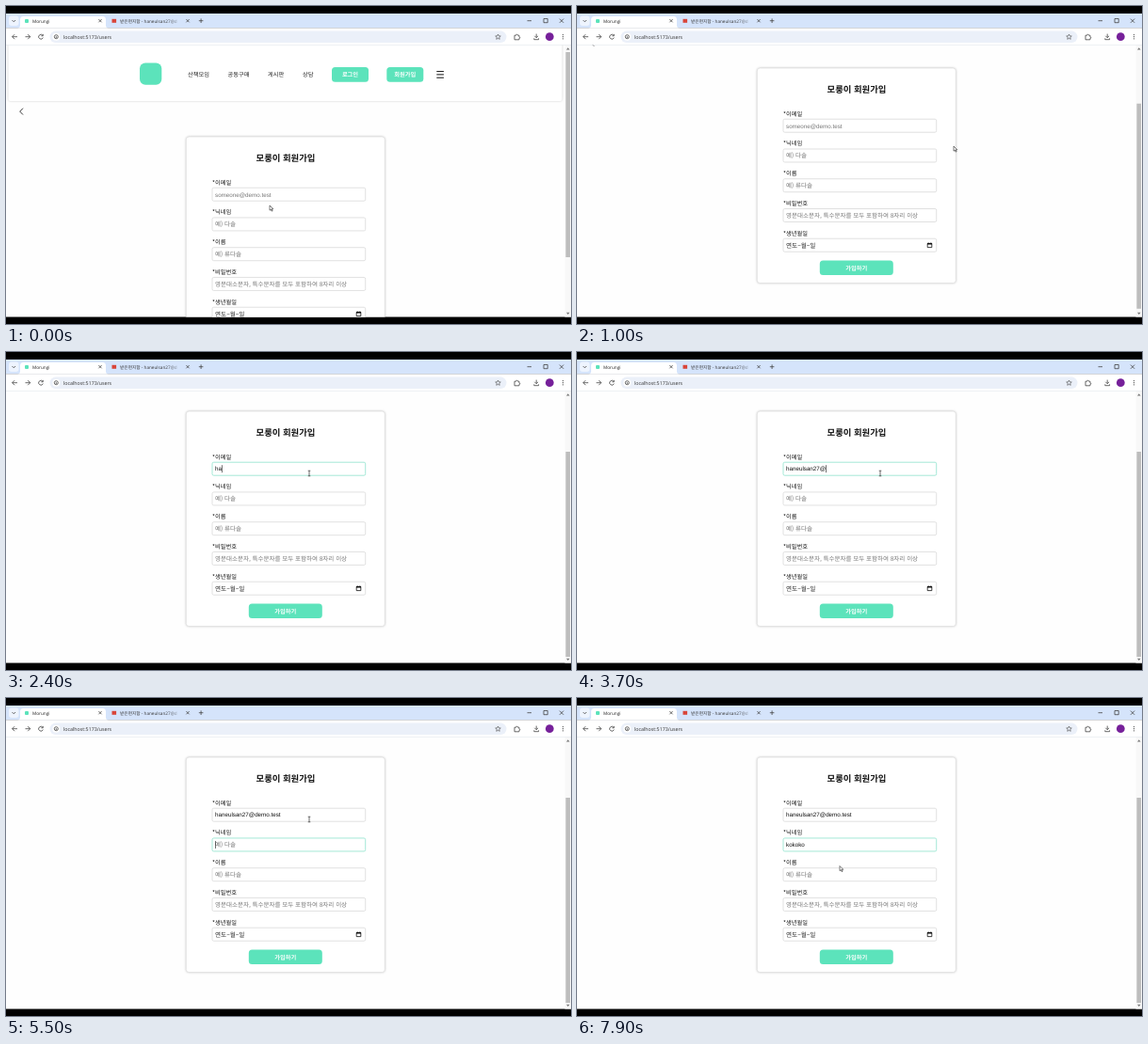
Recreate the animation shown at these times as an HTML page. Size 600x338 px, loop 8 s.

```html
<!DOCTYPE html>
<html lang="ko">
<head>
<meta charset="utf-8">
<title>회원가입</title>
<style>
html, body { margin: 0; width: 100%; height: 100%; overflow: hidden; background: #000; }
svg { display: block; width: 100vw; height: 100vh; }
text { font-family: "Noto Sans CJK KR", "Noto Sans CJK", sans-serif; text-rendering: geometricPrecision; white-space: pre; }
.latin { font-family: "Liberation Sans", "Noto Sans CJK KR", sans-serif; }
.ui { font-family: "Open Sans", "Noto Sans CJK KR", sans-serif; }
.line { fill: none; stroke: #444; stroke-width: .8; }
.shadow { filter: drop-shadow(0 .6px 1.2px #0003); }
</style>
</head>
<body>
<svg id="stage" viewBox="0 0 600 338"></svg>
<script>
const LOOP = 8000, MAX_SCROLL = 76, MINT = '#5ce3bb';
const stage = document.getElementById('stage');
const $ = id => document.getElementById(id);

const rect = (x, y, w, h, fill, r = 0, more = '') =>
  `<rect x="${x}" y="${y}" width="${w}" height="${h}" rx="${r}" fill="${fill}" ${more}/>`;
const label = (x, mid, str, size = 6.25, fill = '#222', more = '') =>
  `<text x="${x}" y="${mid + size * .37}" font-size="${size}" fill="${fill}" ${more}>${str}</text>`;
const line = (d, more = '') => `<path class="line" d="${d}" ${more}/>`;
const button = (x, y, w, h, str) => rect(x, y, w, h, MINT, 3.5) +
  label(x + w / 2, y + h / 2, str, 6.25, '#fff', 'font-weight="700" text-anchor="middle"');

// Form rows in page coordinates
const rowTop = i => 193.2 + 31.75 * i;
const rows = [
  ['이메일', 'someone@demo.test', 'class="latin"', 6.25],
  ['닉네임', '예) 다솔', '', 6.5],
  ['이름', '예) 류다솔', '', 6.5],
  ['비밀번호', '영문대소문자, 특수문자를 모두 포함하여 8자리 이상', '', 6.5],
  ['생년월일', '연도–월–일', '', 6.6]
];
const field = ([name, hint, more, size], i) => {
  const y = rowTop(i);
  return label(219, y - 5.9, '*' + name, 6.25, '#111', 'font-weight="500"') +
    rect(219, y, 162.7, 14, '#fff', 1.6, `id="box${i}" stroke-width=".7"`) +
    label(222, y + 7, hint, size, i == 4 ? '#222' : '#777', `id="hint${i}" ${more}`) +
    label(222, y + 6.6, '', 6.25, '#111', `id="value${i}" class="latin"`);
};

const header =
  rect(2.5, 30, 588, 71, '#fff', 2, 'class="shadow"') +
  rect(142, 60.5, 23.3, 23.3, MINT, 6) +
  [[193, '산책모임'], [235.5, '공동구매'], [278, '게시판'], [315, '상담']]
    .map(([x, s]) => label(x, 73, s)).join('') +
  button(346, 65, 39, 15.7, '로그인') + button(404.3, 65, 39, 15.7, '회원가입') +
  line('M457.3 69.6h7.6m-7.6 3.3h7.6m-7.6 3.3h7.6', 'style="stroke:#111;stroke-width:1"') +
  line('M18 108.7l-3.3 3.4 3.3 3.4', 'style="stroke:#222;stroke-width:.9"');

const form =
  rect(191.3, 139, 211, 228.5, '#fff', 3, 'class="shadow" stroke="#ddd" stroke-width=".7"') +
  label(297, 162, '모룽이 회원가입', 9.375, '#111', 'font-weight="700" text-anchor="middle"') +
  rows.map(field).join('') +
  line('M372.2 325.4h4.6v4.2h-4.6zM373.2 324.5v1m2.6 -1v1', 'style="stroke:#111"') +
  rect(372, 325, 5, 1.5, '#111') +
  button(257.8, 343.5, 78, 15.6, '가입하기') +
  rect(0, 0, .6, 8, '#111', 0, 'id="caret"');

const cross = (x, y, r) => line(`M${x - r} ${y - r}l${2 * r} ${2 * r}m0 ${-2 * r}l${-2 * r} ${2 * r}`);
const tabs =
  rect(0, 8, 600, 15.5, '#d5e4fb') +
  rect(3, 10.5, 10.5, 10.5, '#eef4fe', 3) + line('M6.5 15l1.8 1.8 1.8 -1.8') +
  '<path d="M12 23.5q3 0 3 -3v-6q0 -3.5 3.5 -3.5h84q3.5 0 3.5 3.5v6q0 3 3 3z" fill="#fff"/>' +
  rect(20, 14, 4, 4, MINT, 1) + label(28, 16, 'Morungi', 4.7, '#222', 'class="ui"') + cross(100, 15.7, 1.6) +
  rect(112.5, 13.8, 4.6, 4, '#d9453a') +
  label(121, 16, '받은편지함 - haneulsan27@d', 4.7, 'url(#fade)', 'class="ui"') + cross(193, 15.7, 1.6) +
  line('M204.8 15.7h4.6m-2.3 -2.3v4.6M553.5 15.7h4.5M571 13.5h4.2v4.2h-4.2z') + cross(590, 15.7, 2.1);

const toolbar =
  rect(0, 23.3, 600, 18, '#fff') +
  line('M12 32.7h-5.4m2.5 -2.5l-2.5 2.5 2.5 2.5M20.5 32.7h5.2m-2.5 -2.5l2.5 2.5 -2.5 2.5') +
  line('M39 31.3a2.4 2.4 0 1 0 .3 2.3M39.3 29.9v1.9h-1.9') +
  rect(46.5, 26.6, 485, 12.4, '#ebf0f9', 6.2) +
  '<circle cx="53.3" cy="32.7" r="4" fill="#fff"/><circle class="line" cx="53.3" cy="32.7" r="2"/>' + line('M53.3 32.2v1.7') +
  label(61, 32.7, 'localhost:5173/users', 5.3, '#333', 'class="ui"') +
  line('M522.5 30l.8 1.8 2 .2-1.5 1.3.4 2-1.7-1-1.7 1 .4-2-1.5-1.3 2-.2z', 'style="stroke-width:.6"') +
  line('M540 31.2h1.6a.9 .9 0 0 1 1.9 0h1.4v1.6a.8 .8 0 0 1 0 1.7v1.3h-4.9z') +
  line('M563.2 29.6v4m-1.9 -1.8l1.9 1.9 1.9 -1.9M560.8 34.3v1.4h4.8v-1.4') +
  '<circle cx="577.3" cy="32.7" r="4.4" fill="#76209a"/>' +
  [30.6, 32.7, 34.8].map(y => `<circle cx="591.5" cy="${y}" r=".6" fill="#444"/>`).join('') +
  rect(0, 41, 600, .5, '#dde2e8');

stage.innerHTML =
  `<defs><clipPath id="view">${rect(0, 41, 593.5, 289.5, '#fff')}</clipPath>
   <linearGradient id="fade" gradientUnits="userSpaceOnUse" x1="172" x2="187">
   <stop stop-color="#333"/><stop offset="1" stop-color="#333" stop-opacity="0"/></linearGradient></defs>` +
  rect(0, 0, 600, 338, '#000') + rect(0, 41, 600, 289.5, '#fefefe') +
  `<g clip-path="url(#view)"><g id="page">${header}${form}</g></g>` +
  rect(593.5, 41, 6.5, 289.5, '#f8f8f8') + rect(594.4, 49, 4.6, 218, '#bdbdbd', 0, 'id="thumb"') +
  '<path d="M595 46.5h3.6l-1.8 -2.3zM595 325.8h3.6l-1.8 2.3z" fill="#777"/>' +
  tabs + toolbar +
  `<path id="arrow" d="M0 0v5.2l1.3 -1.1 .9 2 .9 -.4 -.9 -1.9h1.6z" fill="#fff" stroke="#222" stroke-width=".6"/>` +
  `<path id="beam" d="M-1.3 -2.8h2.6M0 -2.8v5.6M-1.3 2.8h2.6" fill="none" stroke="#333" stroke-width=".7"/>`;

// Time of focus, then the time of every key press
const entries = [
  { text: 'haneulsan27@demo.test', focus: 1800, keys: [2200, 2400, 2600, 2700, 2800, 2900, 3000, 3100, 3200,
    3400, 3500, 3700, 3900, 4000, 4100, 4200, 4300, 4500, 4600, 4700, 4800] },
  { text: 'kokoko', focus: 5100, keys: [6200, 6400, 6600, 6900, 7000, 7200] }
];
const pointer = [[100, 280, 212], [600, 419.5, 142.5], [700, 419.5, 142.5], [1000, 400, 149], [1600, 322, 129],
  [7300, 322, 129], [7500, 300, 150], [7600, 300, 150], [7900, 279, 178.5]];

function pointerAt(t) {
  const next = pointer.findIndex(k => k[0] > t);
  if (next == 0) return pointer[0].slice(1);
  if (next < 0) return pointer.at(-1).slice(1);
  const [t0, x0, y0] = pointer[next - 1], [t1, x1, y1] = pointer[next];
  const u = (t - t0) / (t1 - t0), e = u * u * (3 - 2 * u);
  return [x0 + (x1 - x0) * e, y0 + (y1 - y0) * e];
}

function draw(t) {
  const u = Math.min(1, Math.max(0, (t - 500) / 600));
  const scroll = MAX_SCROLL * (1 - (1 - u) ** 1.8);
  $('page').setAttribute('transform', `translate(0 ${-scroll})`);
  $('thumb').setAttribute('y', 49 + scroll * .75);

  const active = entries.findLastIndex(e => t >= e.focus);
  rows.forEach((_, i) => $('box' + i).setAttribute('stroke', i == active ? '#7fe0c6' : '#d4d4d4'));
  entries.forEach((e, i) => {
    const count = e.keys.filter(k => k <= t).length;
    $('value' + i).textContent = e.text.slice(0, count);
    $('hint' + i).style.display = count ? 'none' : '';
    if (i == active) {
      const idle = t - (count ? e.keys[count - 1] : e.focus);
      const width = count ? $('value' + i).getComputedTextLength() : 0;
      $('caret').setAttribute('x', 222 + width);
      $('caret').setAttribute('y', rowTop(i) + 3);
      $('caret').style.opacity = idle % 1000 < 500 ? 1 : 0;
    }
  });
  if (active < 0) $('caret').style.opacity = 0;

  const [x, y] = pointerAt(t);
  const inField = x > 219 && x < 382 && rows.some((_, i) => y > rowTop(i) - scroll && y < rowTop(i) - scroll + 14);
  $('arrow').style.display = inField ? 'none' : '';
  $('beam').style.display = inField ? '' : 'none';
  for (const id of ['arrow', 'beam']) $(id).setAttribute('transform', `translate(${x} ${y})`);
}

const start = performance.now();
function tick() {
  draw(Math.floor((performance.now() - start) % LOOP / 100) * 100);
  requestAnimationFrame(tick);
}
tick();
</script>
</body>
</html>
```
